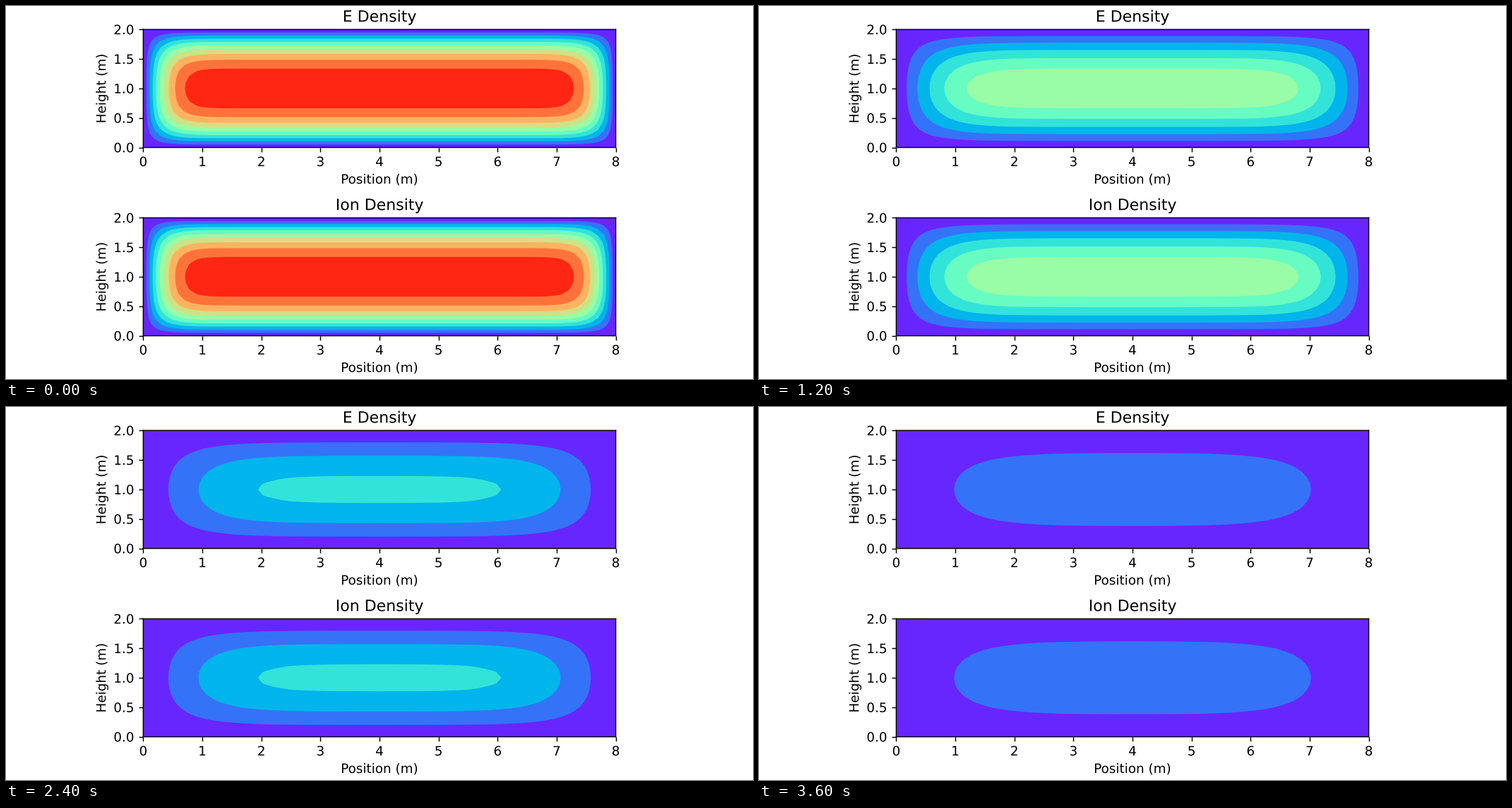
A matplotlib script that plays this animation: 1058x529 px, repeating every 4.6 s.

```python
import numpy as np
import matplotlib.pyplot as plt
from matplotlib.animation import FuncAnimation
from matplotlib.patheffects import Normal
from matplotlib.text import Text

W, H, DPI = 1058, 529, 132.25
LENGTH, HEIGHT = 8.0, 2.0
PANEL_H = 167.3
PANEL_W = PANEL_H * LENGTH / HEIGHT
DIFFUSION = 0.0797          # diffusion coefficient times time per step
STEPS = 10
TICK_MS, LOOP_MS = 200, 4600

# Smooth sub-pixel placement of lines and glyphs.
plt.rcParams["path.snap"] = False
plt.rcParams["text.hinting"] = "none"

x = np.linspace(0, LENGTH, 81)
y = np.linspace(0, HEIGHT, 21)


def decay(s, size, dt):
    """Uniform start between two absorbing walls, as a sine series."""
    k = np.arange(1, 120, 2)[:, None] * np.pi / size
    return (4 / (k * size) * np.sin(k * s) * np.exp(-k**2 * dt)).sum(axis=0)


def density(step):
    dt = DIFFUSION * (step + 1)
    return np.outer(decay(y, HEIGHT, dt), decay(x, LENGTH, dt))


def band_color(i):
    return plt.cm.rainbow((i + 0.5) / 10)


def make_axes(fig, title, top):
    ax = fig.add_axes([(W - PANEL_W) / 2 / W, 1 - (top + PANEL_H) / H,
                       PANEL_W / W, PANEL_H / H])
    ax.set(xlim=(0, LENGTH), ylim=(0, HEIGHT), title=title,
           xlabel="Position (m)", ylabel="Height (m)",
           xticks=range(9), yticks=np.arange(0, 2.1, 0.5),
           facecolor=band_color(0))
    return ax


fig = plt.figure(figsize=(W / DPI, H / DPI), dpi=DPI, facecolor="white")
panels = [make_axes(fig, "E Density", 33.3),
          make_axes(fig, "Ion Density", 300.4)]
for label in fig.findobj(Text):
    label.set_path_effects([Normal()])
bands = []


def draw(frame):
    while bands:
        bands.pop().remove()
    n = density(min(frame // 2, STEPS - 1))
    # Stacked fills keep the band edges free of seams.
    for ax in panels:
        for i in range(1, 10):
            if i / 10 < n.max():
                bands.append(ax.contourf(x, y, n, [i / 10, 2],
                                         colors=[band_color(i)],
                                         antialiased=True))
    return bands


anim = FuncAnimation(fig, draw, frames=LOOP_MS // TICK_MS, init_func=lambda: [],
                     interval=TICK_MS, repeat=True, repeat_delay=0, blit=False)
plt.show()
```
